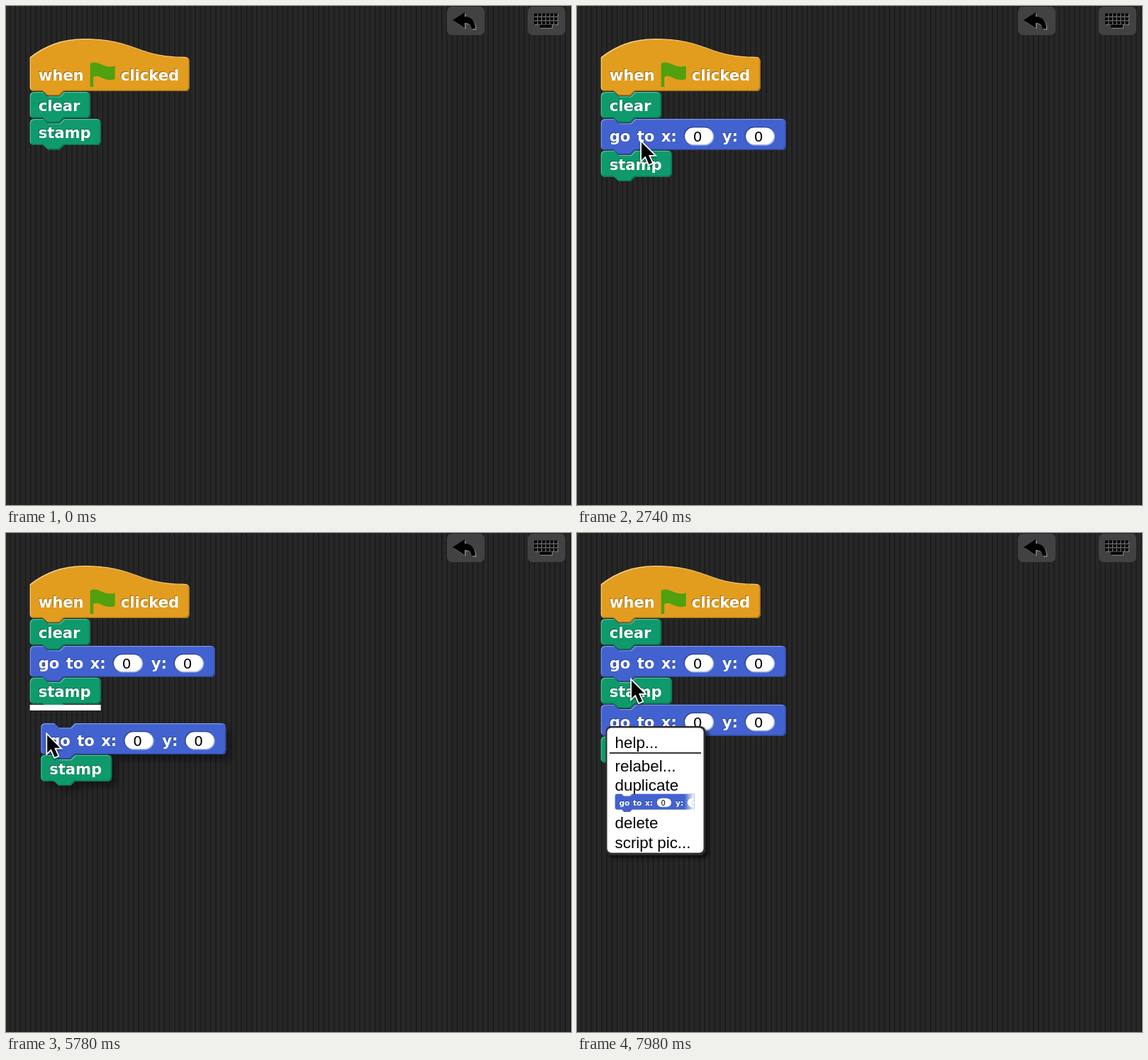
Write an HTML page with a canvas that moves like this. It is 797 by 703 pixels and loops after 8 s.

```html
<!DOCTYPE html>
<html lang="en">
<head>
<meta charset="utf-8">
<title>Block script editor</title>
<style>
  html, body { margin: 0; width: 100%; height: 100%; overflow: hidden; background: #252525; }
  canvas { display: block; }
</style>
</head>
<body>
<canvas id="stage" width="797" height="703"></canvas>
<script>
const ctx = document.getElementById('stage').getContext('2d');
const LOOP = 8000;
const LEFT = 33.7;
const BOLD = 'bold 21.1px "DejaVu Sans", sans-serif';
const PLAIN = '20px "DejaVu Sans", sans-serif';
const MENU_FONT = '22.4px "Liberation Sans", sans-serif';

// Cursor path: time, x, y
const CURSOR = [
  [0, -330, 300], [500, -130, 328], [760, -20, 336], [880, 15, 342],
  [1040, 67.5, 295], [1120, 88, 285], [1380, 107, 245], [1600, 105, 208],
  [1700, 90, 194], [2000, 90, 194], [2200, 90, 190], [4160, 90, 190],
  [4560, 112, 270], [4800, 112, 270], [5100, 126, 276], [5240, 126, 276],
  [5440, 116, 303], [5760, 60, 284], [6000, 40, 272], [7450, 40, 272],
  [7880, 76, 206], [8000, 76, 206]
];
const PRESSES = [[0, 1980], [3420, 3620], [4600, 4780], [6080, 6320], [6700, 6900]];
const MENUS = [[3560, 4760, 90.5, 191], [6860, 8000, 40, 271.5]];
const DROP_1 = 1980, COPY = 4760, DROP_2 = 6120;
const DRAG_LAG = 80;

const within = (t, from, to) => t >= from && t < to;

// Hermite interpolation that comes to rest next to pauses
function cursorAt(t) {
  t = Math.max(0, t);
  let i = CURSOR.findIndex(k => k[0] > t) - 1;
  if (i < 0) i = CURSOR.length - 2;
  const a = CURSOR[i], b = CURSOR[i + 1], span = b[0] - a[0], u = (t - a[0]) / span;
  const same = (p, q) => p[1] === q[1] && p[2] === q[2];
  const slope = (j, axis) => {
    const p = CURSOR[j - 1], k = CURSOR[j], n = CURSOR[j + 1];
    if (!p || !n || same(p, k) || same(k, n)) return 0;
    return (n[axis] - p[axis]) / (n[0] - p[0]) * span;
  };
  const value = axis => {
    const d = b[axis] - a[axis], m0 = slope(i, axis), m1 = slope(i + 1, axis);
    return a[axis] + m0 * u + (3 * d - 2 * m0 - m1) * u * u + (m0 + m1 - 2 * d) * u * u * u;
  };
  return { x: value(1), y: value(2) };
}

const lowerHalf = (w, h) =>
  `V${h - 6} Q${w} ${h} ${w - 6} ${h} H48.3 L42 ${h + 6.3} H25.2 L18.9 ${h} H6 Q0 ${h} 0 ${h - 6} Z`;
const commandPath = (w, h) =>
  new Path2D(`M0 6 Q0 0 6 0 H18.9 L25.2 6.3 H42 L48.3 0 H${w - 6} Q${w} 0 ${w} 6 ` + lowerHalf(w, h));
const hatPath = new Path2D(
  'M0 26 A122 122 0 0 1 75 0 C150 0 150 25.7 219 25.7 Q225 26 225 32 ' + lowerHalf(225, 74));

const GREEN = { fill: '#0e9a6c', light: '#56bd9a', dark: '#0a6b4b' };
const BLUE = { fill: '#4262d0', light: '#8195e0', dark: '#2e4491' };
const ORANGE = { fill: '#e29d1f', light: '#f0cf8f', dark: '#9e6e16' };

const BLOCKS = {
  hat: { path: hatPath, step: 75, color: ORANGE, base: 59, words: [['when', 12], ['clicked', 128]] },
  clear: { path: commandPath(85, 37), step: 38, color: GREEN, base: 27, words: [['clear', 12]] },
  stamp: { path: commandPath(100, 37), step: 38, color: GREEN, base: 27, words: [['stamp', 12]] },
  goTo: {
    path: commandPath(261, 44), step: 44.7, color: BLUE, base: 32,
    words: [['go', 12], ['to', 51], ['x:', 85], ['y:', 171]], slots: [117, 203]
  }
};

function at(x, y, draw) {
  ctx.save();
  ctx.translate(x, y);
  draw();
  ctx.restore();
}

function roundBox(x, y, w, h, r, fill) {
  ctx.beginPath();
  ctx.roundRect(x, y, w, h, r);
  ctx.fillStyle = fill;
  ctx.fill();
}

function edge(path, shift, color) {
  const band = new Path2D(path);
  band.addPath(path, new DOMMatrix().translate(shift, shift));
  ctx.fillStyle = color;
  ctx.fill(band, 'evenodd');
}

function drawFlag() {
  ctx.fillStyle = '#50a00f';
  ctx.fill(new Path2D('M85 35 C98 29 102 43 120 38.5 V57 C104 62 99 49 89.5 54 V68 H85 Z'));
}

function drawSlot(x) {
  roundBox(x, 11, 42, 26, 13, BLUE.dark);
  roundBox(x + 1.5, 12.5, 41, 25, 12.5, '#aab6ea');
  roundBox(x + 1.5, 12.5, 39.5, 23.5, 12, '#fff');
  ctx.font = PLAIN;
  ctx.fillStyle = '#000';
  ctx.fillText('0', x + 13, 32);
}

function drawBlock(block) {
  const { path, color, words, base, slots = [] } = block;
  ctx.fillStyle = color.fill;
  ctx.fill(path);
  ctx.save();
  ctx.clip(path);
  edge(path, 1.2, color.light);
  edge(path, -1.2, color.dark);
  ctx.restore();
  ctx.font = BOLD;
  for (const [word, x] of words) {
    ctx.fillStyle = color.dark;
    ctx.fillText(word, x - 1, base - 1);
    ctx.fillStyle = '#fff';
    ctx.fillText(word, x, base);
  }
  slots.forEach(drawSlot);
  if (block === BLOCKS.hat) drawFlag();
}

function drawStack(names, x, y, paint = drawBlock) {
  for (const name of names) {
    at(x, y, () => paint(BLOCKS[name]));
    y += BLOCKS[name].step;
  }
}

function drawDragged(names, x, y) {
  ctx.save();
  ctx.shadowColor = 'rgba(0,0,0,.35)';
  ctx.shadowBlur = 9;
  ctx.shadowOffsetX = ctx.shadowOffsetY = 8;
  drawStack(names, x, y, block => {
    ctx.fillStyle = block.color.fill;
    ctx.fill(block.path);
  });
  ctx.restore();
  drawStack(names, x, y);
}

function drawBackground() {
  ctx.fillStyle = '#272727';
  ctx.fillRect(0, 0, 797, 703);
  ctx.fillStyle = '#1c1c1c';
  for (let x = 5; x < 797; x += 7.25) ctx.fillRect(x, 0, 1.8, 703);
}

function drawButtons() {
  roundBox(622, 1, 53, 40, 7, '#424242');
  roundBox(736, 1, 53, 40, 7, '#424242');
  const arrow = new Path2D('M630 20 L647 9 V15 C657 15 662 22 662 32 H657 C656 26 653 24 647 24 V31 Z');
  at(1.5, 1.5, () => { ctx.fillStyle = '#858585'; ctx.fill(arrow); });
  ctx.fillStyle = '#000';
  ctx.fill(arrow);
  const key = (x, y, w) => {
    ctx.fillStyle = '#8c8c8c';
    ctx.fillRect(x + 1, y + 1, w, 4.2);
    ctx.fillStyle = '#000';
    ctx.fillRect(x, y, w, 4.2);
  };
  for (let row = 0; row < 3; row++)
    for (let col = 0; col < 6; col++) key(745 + col * 5.7, 10.5 + row * 5.5, 4.4);
  key(753, 26.5, 17);
}

function drawMenu() {
  ctx.save();
  ctx.shadowColor = 'rgba(0,0,0,.6)';
  ctx.shadowBlur = 5;
  ctx.shadowOffsetX = ctx.shadowOffsetY = 4;
  roundBox(0.5, 0.5, 141, 182, 8, '#2b2e2e');
  ctx.restore();
  roundBox(2.5, 3, 136, 176, 6, '#fff');
  ctx.fillStyle = '#222';
  ctx.fillRect(6, 37.5, 129, 1.8);
  ctx.font = MENU_FONT;
  ctx.fillStyle = '#000';
  const items = [['help...', 31], ['relabel...', 64], ['duplicate', 91], ['delete', 144.5], ['script pic...', 172]];
  for (const [label, y] of items) ctx.fillText(label, 13.5, y);
  at(13.5, 96, () => {
    ctx.beginPath();
    ctx.rect(0, 0, 112, 27);
    ctx.clip();
    ctx.scale(0.5, 0.5);
    drawBlock(BLOCKS.goTo);
    ctx.scale(2, 2);
    const fade = ctx.createLinearGradient(98, 0, 112, 0);
    fade.addColorStop(0, 'rgba(255,255,255,0)');
    fade.addColorStop(1, '#fff');
    ctx.fillStyle = fade;
    ctx.fillRect(98, 0, 14, 27);
  });
}

function drawRing() {
  for (const [width, color] of [[6, '#fff'], [3.2, '#000']]) {
    ctx.beginPath();
    ctx.arc(0.2, 1, 39, 0, Math.PI * 2);
    ctx.lineWidth = width;
    ctx.strokeStyle = color;
    ctx.stroke();
  }
}

function drawCursor() {
  const arrow = new Path2D('M1 2 V27 L6.5 21.5 L11.5 33 L16 31 L11 20 H19 Z');
  ctx.save();
  ctx.shadowColor = 'rgba(0,0,0,.4)';
  ctx.shadowBlur = 3;
  ctx.shadowOffsetY = 2;
  ctx.lineWidth = 3.5;
  ctx.strokeStyle = '#fff';
  ctx.stroke(arrow);
  ctx.restore();
  ctx.fillStyle = '#000';
  ctx.fill(arrow);
}

function draw(t) {
  drawBackground();
  drawButtons();

  const script = ['hat', 'clear'];
  if (t >= DROP_1) script.push('goTo');
  script.push('stamp');
  if (t >= DROP_2) script.push('goTo', 'stamp');
  drawStack(script, LEFT, 46);

  // Insertion marks for the spot where the held blocks would land
  ctx.fillStyle = '#fff';
  if (within(t, 1480, DROP_1)) ctx.fillRect(LEFT, 159, 85, 8);
  if (within(t, 5640, DROP_2)) ctx.fillRect(LEFT, 242, 100, 8);

  const cursor = cursorAt(t);
  const grip = cursorAt(t - DRAG_LAG);
  if (t < DROP_1) drawDragged(['goTo'], grip.x - 52.2, grip.y - 14);
  if (within(t, COPY, DROP_2)) drawDragged(['goTo', 'stamp'], grip.x - 20, grip.y - 20);

  for (const [from, to, x, y] of MENUS) if (within(t, from, to)) at(x, y, drawMenu);
  if (PRESSES.some(([from, to]) => within(t, from, to))) at(cursor.x, cursor.y, drawRing);
  at(cursor.x, cursor.y, drawCursor);
}

const start = performance.now();
function tick() {
  draw((performance.now() - start) % LOOP);
  requestAnimationFrame(tick);
}
tick();
</script>
</body>
</html>
```
